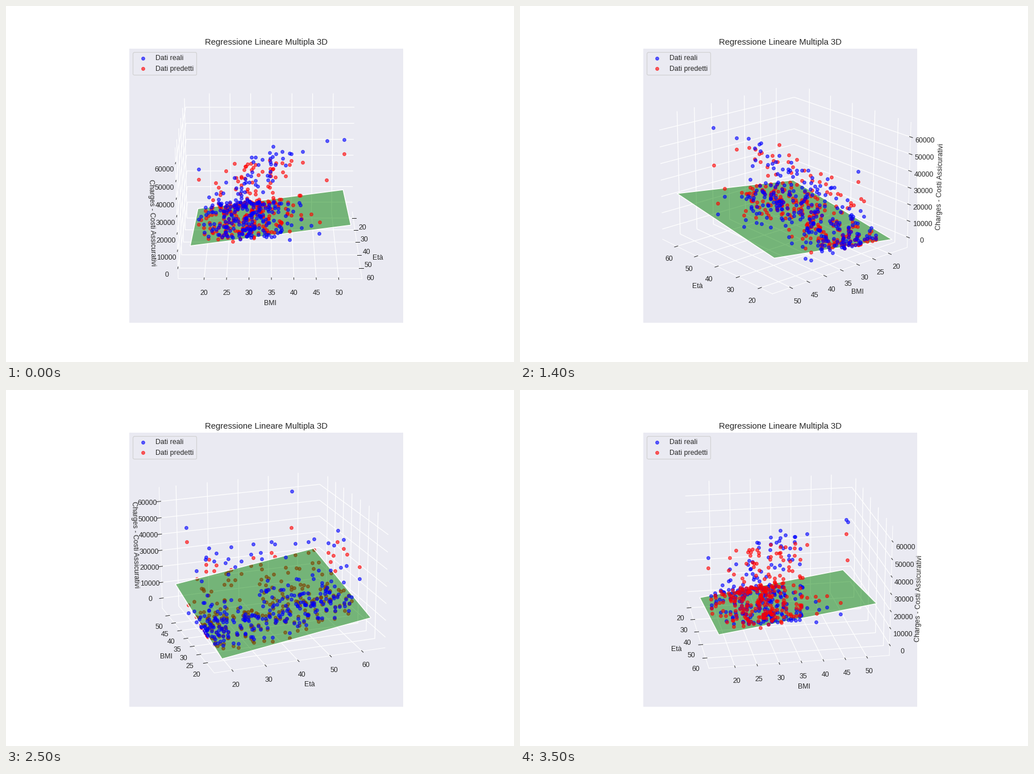
A matplotlib script that plays this animation: 894 by 626 pixels, repeating every 3.6 s.

```python
import numpy as np
import matplotlib.pyplot as plt
from matplotlib.animation import FuncAnimation
from mpl_toolkits.mplot3d.art3d import Poly3DCollection

DPI = 89.4
INK = "0.15"
plt.rcParams.update({
    "font.family": "Liberation Sans",
    "font.size": 10,
    "text.color": INK,
    "axes.labelcolor": INK,
    "xtick.color": INK,
    "ytick.color": INK,
    "axes.facecolor": "#EAEAF2",
    "axes.edgecolor": "white",
    "grid.color": "white",
    "grid.linewidth": 1.0,
})

AGE, BMI, COST = (18, 64), (16.815, 52.58), (-1600, 63770)

# Extreme smokers: age, BMI, charges
EXTREMES = [(22, 52.58, 44501), (54, 47.41, 63770), (32, 17.77, 32734),
            (29, 35.4, 44700), (63, 22.0, 29000), (63, 35.2, 47200)]


def plane(age, bmi):
    return 257 * age + 339 * bmi - 11926


def people(rng, n, low, high):
    """Ages skewed towards the young, BMI roughly normal."""
    age = np.floor(18 + 46 * rng.random(n) ** 1.25)
    bmi = np.clip(rng.normal(30.7, 6, n), low, high)
    return age, bmi


def make_data():
    rng = np.random.default_rng(7)

    # smokers: charges jump once BMI reaches 30
    age, bmi = people(rng, 47, 22, 42.5)
    cost = 265 * age + 500 * bmi + 12500 * (bmi >= 30)
    cost += rng.normal(0, 1000, len(age))
    smokers = np.vstack([EXTREMES, np.column_stack([age, bmi, cost])])

    # non-smokers: charges grow with age, a few are unlucky
    n = 215
    age, bmi = people(rng, n, 17.8, 47.7)
    cost = 900 + 3 * age ** 2 + rng.gamma(1.5, 500, n)
    cost += (rng.random(n) < 0.07) * rng.uniform(3000, 16000, n)
    others = np.column_stack([age, bmi, cost])

    age, bmi, cost = np.vstack([smokers, others]).T
    guess = plane(age, bmi) + rng.normal(0, 600, len(age))
    guess[:len(smokers)] += 23800
    return age, bmi, cost, guess


def padded(lo, hi):
    pad = (hi - lo) * (0.05 + 1.1 / 48)
    return lo - pad, hi + pad


fig = plt.figure(figsize=(894.01 / DPI, 626.01 / DPI), dpi=DPI,
                 facecolor="white")
ax = fig.add_subplot(projection="3d")

age, bmi, real, guess = make_data()
for values, color, name in ((real, "blue", "Dati reali"),
                            (guess, "red", "Dati predetti")):
    ax.scatter(age, bmi, values, c=color, alpha=0.6, label=name,
               depthshade=False)

corners = [(AGE[i], BMI[j]) for i, j in ((0, 0), (1, 0), (1, 1), (0, 1))]
quad = [(a, b, plane(a, b)) for a, b in corners]
ax.add_collection3d(Poly3DCollection(
    [quad], facecolors=[(0, 0.5, 0, 0.5)], edgecolors="white", linewidths=1.2))

ax.set_xlim(*padded(*AGE))
ax.set_ylim(*padded(*BMI))
ax.set_zlim(*padded(*COST))
ax.set_xticks(range(20, 61, 10))
ax.set_yticks(range(20, 51, 5))
ax.set_zticks(range(0, 60001, 10000))
for axis in (ax.xaxis, ax.yaxis, ax.zaxis):
    axis.set_pane_color((1, 1, 1, 0))

ax.set_xlabel("Età")
ax.set_ylabel("BMI")
ax.set_zlabel("Charges - Costi Assicurativi")
ax.set_title("Regressione Lineare Multipla 3D", fontsize=12)
ax.legend(loc="upper left")


def update(i):
    ax.view_init(elev=20, azim=10 * i)
    return ()


anim = FuncAnimation(fig, update, frames=36, interval=100, repeat=True,
                     repeat_delay=0)
plt.show()
```
